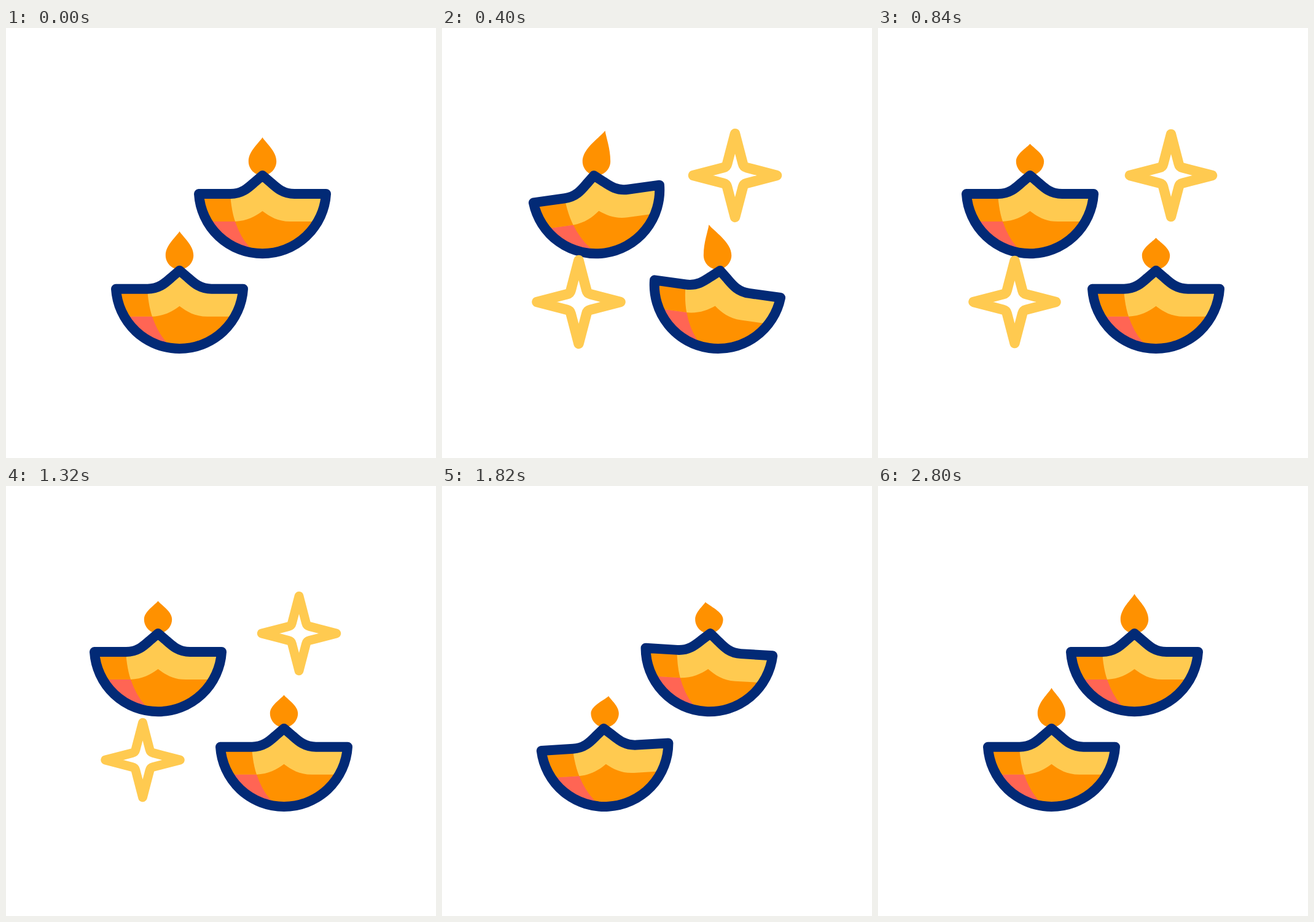
An HTML page for the animation above (2820 ms loop, 700x700 px).

```html
<!DOCTYPE html>
<html lang="en">
<head>
<meta charset="utf-8">
<title>Oil lamps</title>
<style>
  html, body { margin: 0; width: 100%; height: 100%; overflow: hidden; background: #fff; }
  svg { display: block; width: 100vw; height: 100vh; }
</style>
</head>
<body>
<svg viewBox="0 0 700 700">
  <defs>
    <path id="outline" d="M-103.5 0H-52C-34 0 -24 -9 -14 -18L0 -30L14 -18C24 -9 34 0 52 0H103.5A103.7 103.7 0 0 1 -103.5 0Z"/>
    <clipPath id="bowl"><use href="#outline"/></clipPath>
    <g id="lamp">
      <g clip-path="url(#bowl)">
        <path fill="#ff9100" d="M-110 -40H110V110H-110Z"/>
        <path fill="#ffca50" d="M-110 45H-45C-25 44 -12 37 0 28C12 37 25 45 45 45H110V-40H-110Z"/>
        <path fill="#ff9100" d="M-110 -20H-53.5Q-52.5 22 -44.5 45H-110Z"/>
        <path fill="#ff6554" d="M-110 45H-44.5Q-36 70 -22 86L-10 100H-110Z"/>
      </g>
      <use href="#outline" fill="none" stroke="#022a76" stroke-width="16" stroke-linejoin="round"/>
    </g>
    <path id="star" fill="none" stroke="#ffca50" stroke-width="16.5" stroke-linejoin="round"
      d="M0 -68L12.8 -19Q14 -14 19 -12.8L68 0L19 12.8Q14 14 12.8 19L0 68L-12.8 19Q-14 14 -19 12.8L-68 0L-19 -12.8Q-14 -14 -12.8 -19Z"/>
  </defs>
  <g class="unit"><path class="flame" fill="#ff9100"/><use class="body" href="#lamp"/></g>
  <g class="unit"><path class="flame" fill="#ff9100"/><use class="body" href="#lamp"/></g>
  <use class="spark" href="#star"/>
  <use class="spark" href="#star"/>
</svg>
<script>
const LOOP = 2820;
const TRAVEL = 170;
const RETURN_DELAY = 1300;

const progress = (t, from, to) => Math.min(1, Math.max(0, (t - from) / (to - from)));

// Smooth change from 0 to 1.
function step(t, from, to) {
  const u = progress(t, from, to);
  return u * u * (3 - 2 * u);
}

// Smooth rise from 0 to 1 and back.
const hump = (t, from, to) => Math.sin(Math.PI * progress(t, from, to)) ** 2;

// Lamps swap sides, overshoot, and swap back with one extra rebound.
const shift = t =>
  TRAVEL * (step(t, 90, 462) - step(t, 1360, 1790)) +
  14 * hump(t, 270, 740) - 17.5 * hump(t, 1660, 2000) + 12 * hump(t, 1940, 2420);

const tilt = t =>
  -8 * hump(t, 120, 660) + 3 * hump(t, 560, 840) +
  7.4 * hump(t, 1380, 1960) - 6 * hump(t, 1820, 2340);

// Flames trail behind the swing, flicker steadily and duck after each move.
const lean = t => -1.77 * tilt(t);
const duck = t => 10 * hump(t, 560, 1120);
const tip = t =>
  -92 + 11 * Math.sin(5 * 2 * Math.PI * t / LOOP) + duck(t) + duck(t - RETURN_DELAY);

const sparkSize = t => step(t, 100, 395) - .013 * step(t, 520, 840) - .987 * step(t, 1270, 1540);

function flamePath(x, y) {
  const r = 22.7, mid = -53, bottom = -30;
  const height = mid - y;
  const bend = x / 4;
  const neck = y + height * .22;
  const cheek = mid - height * .43;
  return `M${x} ${y}C${x + 5 - bend} ${neck} ${r} ${cheek} ${r} ${mid}` +
         `C${r} -40 12 ${bottom} 0 ${bottom}C-12 ${bottom} ${-r} -40 ${-r} ${mid}` +
         `C${-r} ${cheek} ${x - 5 - bend} ${neck} ${x} ${y}Z`;
}

// The bottom lamp mirrors the top one.
const lamps = [{ x: 417.5, y: 270, side: 1, lift: 0 }, { x: 282.5, y: 424.7, side: -1, lift: -1.7 }];
const stars = [[477, 240], [222.5, 446]];
const units = document.querySelectorAll('.unit');
const sparks = document.querySelectorAll('.spark');

function draw(t) {
  lamps.forEach(({ x, y, side, lift }, i) => {
    const flame = units[i].querySelector('.flame');
    units[i].setAttribute('transform', `translate(${x - side * shift(t)} ${y})`);
    units[i].querySelector('.body').setAttribute('transform', `rotate(${side * tilt(t)})`);
    flame.setAttribute('transform', `translate(0 ${lift})`);
    flame.setAttribute('d', flamePath(side * lean(t), tip(t)));
  });
  const size = sparkSize(t);
  stars.forEach(([x, y], i) => {
    sparks[i].setAttribute('transform', `translate(${x} ${y}) scale(${size})`);
    sparks[i].setAttribute('visibility', size > .01 ? 'visible' : 'hidden');
  });
}

const start = performance.now();
function tick() {
  draw((performance.now() - start) % LOOP);
  requestAnimationFrame(tick);
}
tick();
</script>
</body>
</html>
```
